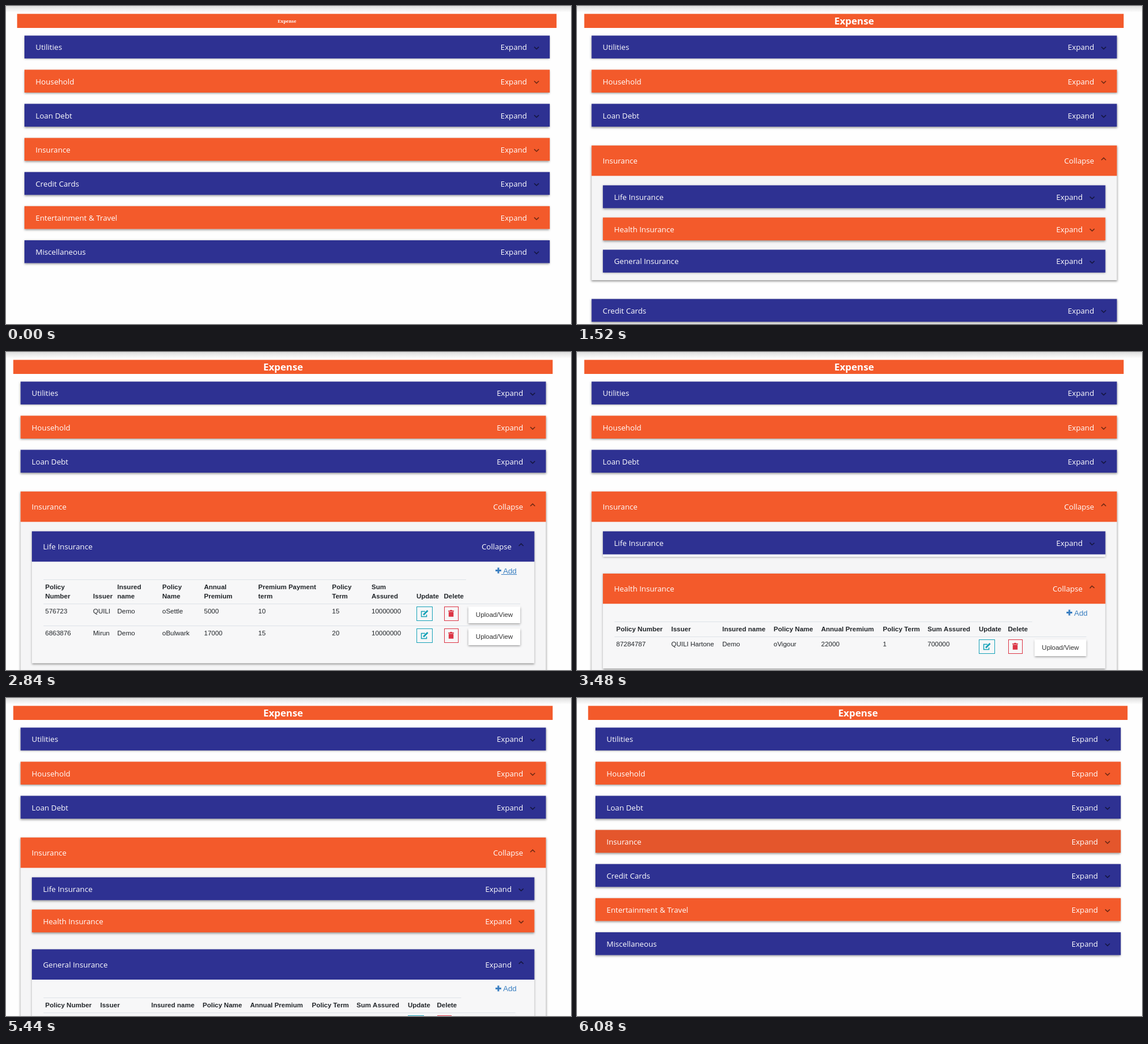
These frames come from a looping animation (980x551 px, 6.44 s). An HTML page with a canvas:

```html
<!DOCTYPE html>
<html lang="en">
<head>
<meta charset="utf-8">
<title>Expense</title>
<style>
  html, body { margin: 0; width: 100%; height: 100%; overflow: hidden; background: #fefefe; }
  canvas { display: block; }
</style>
</head>
<body>
<canvas width="980" height="551"></canvas>
<script>
const ctx = document.querySelector('canvas').getContext('2d');
const LOOP = 6440, STEP = 40;
const BLUE = '#2e3192', ORANGE = '#f35a2b', BLUE_HOVER = '#2b2e89', ORANGE_HOVER = '#e4562c';
const TEAL = '#17a2b8', RED = '#dc3545', LINK = '#3a7fc1', INK = '#212529', RULE = '#dde2e8';
const UI = '"Open Sans", sans-serif', TABLE = '"Liberation Sans", Arial, sans-serif';
const ROW_H = 39.6, OPEN_H = 52.6, MARGIN = 13.1, OUTER_GAP = 19.5, INNER_GAP = 16.2;

const rows = ['Utilities', 'Household', 'Loan Debt', 'Insurance', 'Credit Cards',
  'Entertainment & Travel', 'Miscellaneous'];
const shortHeads = ['Policy Number', 'Issuer', 'Insured name', 'Policy Name', 'Annual Premium',
  'Policy Term', 'Sum Assured', 'Update', 'Delete'];
const shortCols = [68, 163.5, 252, 341, 423.5, 530.5, 608, 697, 747.5, 793.5];

const sections = [
  { name: 'Life Insurance', from: 2200, to: 3280, height: 176, table: {
    heads: ['Policy|Number', 'Issuer', 'Insured|name', 'Policy|Name', 'Annual|Premium',
      'Premium Payment|term', 'Policy|Term', 'Sum|Assured', 'Update', 'Delete'],
    cols: [68, 151, 193, 271, 343.5, 437.5, 565.5, 634, 712, 759.5, 802],
    lines: 2,
    data: [['576723', 'QUILI', 'Demo', 'oSettle', '5000', '10', '15', '10000000'],
      ['6863876', 'Mirun', 'Demo', 'oBulwark', '17000', '15', '20', '10000000']] } },
  { name: 'Health Insurance', from: 3280, to: 4600, height: 115, table: {
    heads: shortHeads, cols: shortCols, lines: 1,
    data: [['87284787', 'QUILI Hartone', 'Demo', 'oVigour', '22000', '1', '700000']] } },
  { name: 'General Insurance', from: 4600, to: 5440, height: 115, table: {
    heads: shortHeads, cols: shortCols, lines: 1,
    data: [['45120938', 'QUILI Hartone', 'Demo', 'oRoam', '8000', '1', '500000']] } }
];

const between = (t, a, b) => t >= a && t < b;

// cubic-bezier(.4, 0, .2, 1)
function ease(x) {
  if (x <= 0) return 0;
  if (x >= 1) return 1;
  let lo = 0, hi = 1, s;
  for (let i = 0; i < 18; i++) {
    s = (lo + hi) / 2;
    const bx = 1.2 * s * (1 - s) ** 2 + 0.6 * s * s * (1 - s) + s ** 3;
    if (bx < x) lo = s; else hi = s;
  }
  return 3 * s * s * (1 - s) + s ** 3;
}
const openness = (t, from, to) => ease((t - from - 40) / 200) - ease((t - to - 40) / 200);

function rect(x, y, w, h, color) {
  ctx.fillStyle = color;
  ctx.fillRect(x, y, w, h);
}

function shadowRect(x, y, w, h, color) {
  ctx.save();
  ctx.shadowColor = 'rgba(0,0,0,.42)';
  ctx.shadowBlur = 3.5;
  ctx.shadowOffsetY = 1.5;
  rect(x, y, w, h, color);
  ctx.restore();
}

function stroke(points, color, width) {
  ctx.strokeStyle = color;
  ctx.lineWidth = width;
  ctx.beginPath();
  points.forEach(p => ctx.lineTo(...p));
  ctx.stroke();
}

function text(str, x, cy, size, family, color, align = 'left', weight = '') {
  ctx.font = `${weight} ${size}px ${family}`;
  ctx.textAlign = align;
  ctx.fillStyle = color;
  ctx.fillText(str, x, Math.round(cy + size * 0.36));
}

function header(name, x, y, w, h, color, isOpen, p) {
  const cy = y + h / 2 + 0.6;
  rect(x, y, w, h, color);
  text(name, x + 19.3, cy, 13.2, UI, '#fff');
  text(isOpen ? 'Collapse' : 'Expand', x + w - 39.5, cy, 13.2, UI, '#fff', 'right');
  ctx.save();
  ctx.translate(x + w - 23, cy - 1.2);
  ctx.rotate(Math.PI * p);
  stroke([[-4, 0.4], [0, 4.2], [4, 0.4]], 'rgba(0,0,0,.54)', 1.6);
  ctx.restore();
}

function clipped(x, y, w, h, draw) {
  if (h < 0.5) return;
  ctx.save();
  ctx.beginPath();
  ctx.rect(x, y, w, h);
  ctx.clip();
  draw();
  ctx.restore();
}

function iconBox(x, y, w, color) {
  ctx.strokeStyle = color;
  ctx.lineWidth = 1;
  ctx.strokeRect(Math.round(x) + 0.5, Math.round(y) + 0.5, w, 24);
}

function editIcon(x, y) {
  iconBox(x, y, 27, TEAL);
  stroke([[x + 15, y + 8.5], [x + 8.5, y + 8.5], [x + 8.5, y + 17.5], [x + 17.5, y + 17.5],
    [x + 17.5, y + 14]], TEAL, 1.5);
  stroke([[x + 12, y + 14.5], [x + 19.5, y + 7]], TEAL, 2.8);
}

function trashIcon(x, y) {
  iconBox(x, y, 24, RED);
  rect(x + 7.5, y + 7, 10, 1.6, RED);
  rect(x + 10.5, y + 6, 4, 1.5, RED);
  rect(x + 8.3, y + 9.3, 8.4, 8.4, RED);
}

function addLink(y, hovered) {
  rect(849, y - 1.5, 10, 3, LINK);
  rect(852.5, y - 5, 3, 10, LINK);
  text('Add', 862.3, y + 0.3, 13.1, TABLE, LINK);
  if (hovered) rect(859, Math.round(y + 6), 27, 1, LINK);
}

function drawTable({ heads, cols, lines, data }, top, addHovered) {
  const button = cols[cols.length - 1];
  const label = (s, x, cy, weight) => text(s, x, cy, 11.5, TABLE, INK, 'left', weight);
  const firstRow = top + 40 + 16.5 * lines;
  addLink(top + 15.3, addHovered);
  rect(65, Math.round(top + 31), button - 69, 1, RULE);
  heads.forEach((head, i) => {
    const parts = head.split('|');
    parts.forEach((part, k) =>
      label(part, cols[i], top + 43.7 + 16.2 * (lines - parts.length + k), 'bold'));
  });
  data.forEach((cells, r) => {
    const y = Math.round(firstRow + 38 * r), n = cells.length;
    rect(65, y, button + 25, 1, RULE);
    cells.forEach((cell, i) => label(cell, cols[i], y + 12.5));
    editIcon(cols[n], y + 5);
    trashIcon(cols[n + 1], y + 5);
    shadowRect(button, y + 5, 90, 29, '#fff');
    text('Upload/View', button + 45, y + 19, 11.5, TABLE, '#333', 'center');
  });
}

// Places the inner panels below `top`; returns the bottom of the list.
function layoutSections(t, top) {
  let y = top, lastP = 0;
  sections.forEach((s, i) => {
    s.p = openness(t, s.from, s.to);
    s.isOpen = between(t, s.from, s.to);
    if (i) y += INNER_GAP + MARGIN * Math.max(s.p, lastP);
    s.y = y;
    s.head = ROW_H + (OPEN_H - ROW_H) * s.p;
    s.body = s.height * s.p;
    y += s.head + s.body;
    lastP = s.p;
  });
  return y;
}

function drawSections(t, x, w) {
  sections.forEach((s, i) => {
    const hovered = !i && between(t, 2000, 2200);
    const color = i % 2 ? ORANGE : hovered ? BLUE_HOVER : BLUE;
    const bodyTop = s.y + s.head;
    shadowRect(x, s.y, w, s.head + s.body, '#f7f7f8');
    clipped(x, bodyTop, w, s.body, () =>
      drawTable(s.table, bodyTop, !i && between(t, 2840, 3000)));
    header(s.name, x, s.y, w, s.head, color, s.isOpen, s.p);
  });
}

function hoveredRow(t) {
  if (t < 40) return -1;
  if (t < 720) return Math.floor((t - 40) / 227);
  return t < 1280 || t >= 5840 ? 3 : -1;
}

function draw(t) {
  const p = openness(t, 1280, 5840);
  const isOpen = between(t, 1280, 5840);
  const shift = p > 0.45 ? -6.7 : 0;
  const x = 32 + shift, w = 911.2;

  rect(0, 0, 980, 551, '#fefefe');
  const band = ctx.createLinearGradient(0, 0, 0, 11);
  band.addColorStop(0, '#dedede');
  band.addColorStop(1, '#fefefe');
  rect(0, 0, 980, 11, band);

  rect(19.3 + shift, 13.6, 935.6, 24.4, ORANGE);
  const grow = Math.min(1, t / 960);
  const family = t < 40 ? '"Noto Serif", serif' : UI;
  text('Expense', 487.4 + shift, 26, 7.6 + 9.2 * grow, family, '#fff', 'center', 'bold');

  let y = 51.3;
  rows.forEach((name, i) => {
    const expanding = i === 3;
    if (expanding) y += MARGIN * p;
    const head = ROW_H + (expanding ? (OPEN_H - ROW_H) * p : 0);
    const bodyTop = y + head;
    const body = expanding ? (layoutSections(t, bodyTop + 16.4) + 13.1 - bodyTop) * p : 0;
    const hovered = hoveredRow(t) === i;
    const color = i % 2 ? (hovered ? ORANGE_HOVER : ORANGE) : (hovered ? BLUE_HOVER : BLUE);
    shadowRect(x, y, w, head + body, '#f5f5f6');
    clipped(x, bodyTop, w, body, () => drawSections(t, x + 19.6, w - 39.6));
    header(name, x, y, w, head, color, expanding && isOpen, expanding ? p : 0);
    y += head + body + OUTER_GAP + (expanding ? MARGIN * p : 0);
  });
}

const start = performance.now();
function tick() {
  const t = (performance.now() - start) % LOOP;
  draw(Math.floor(t / STEP) * STEP);
  requestAnimationFrame(tick);
}
tick();
</script>
</body>
</html>
```
